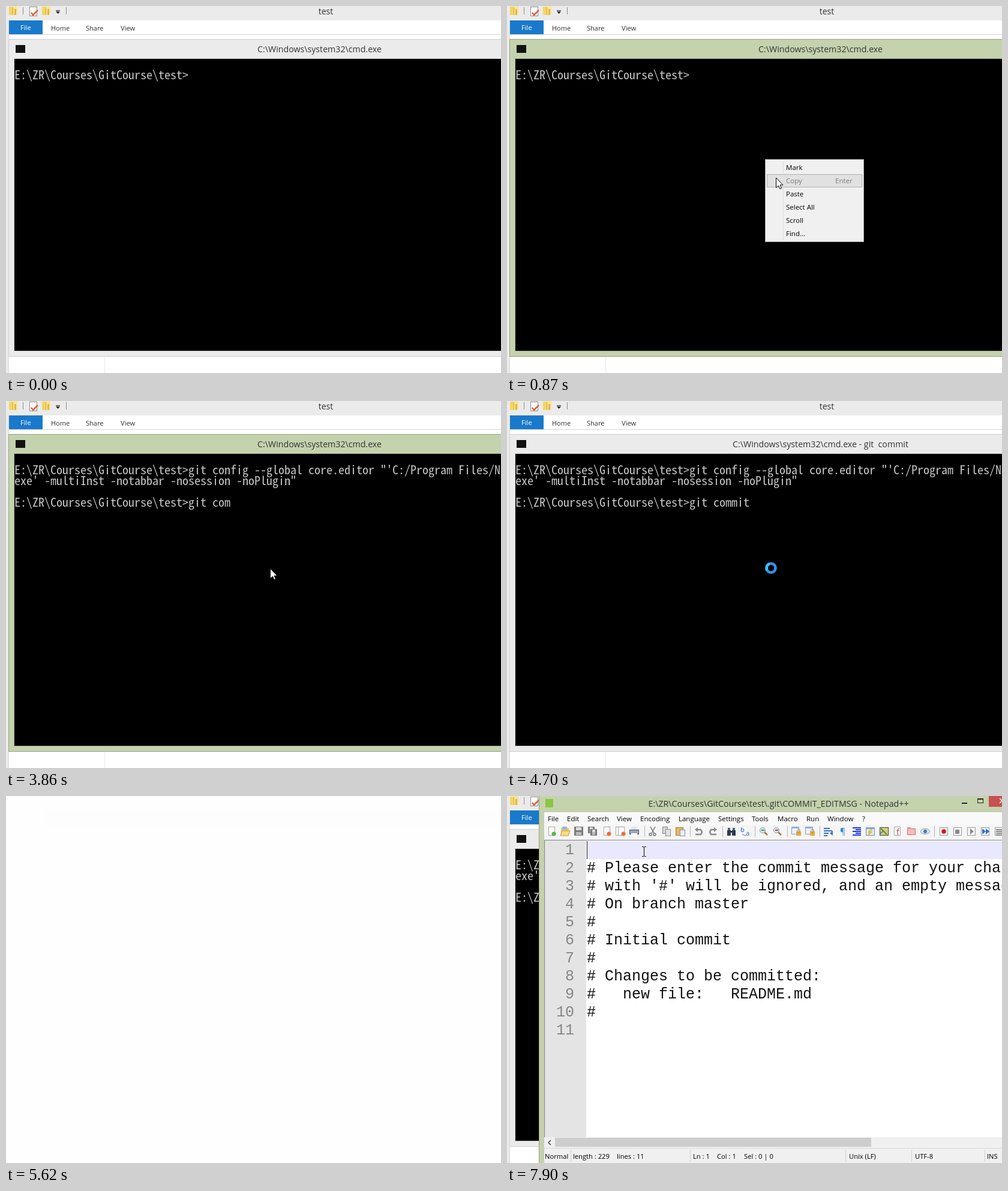
An HTML page with a canvas for the animation above (8000 ms loop, 825 by 611 pixels).

```html
<!DOCTYPE html>
<html lang="en">
<head>
<meta charset="utf-8">
<title>Git commit editor</title>
<style>
html, body { margin: 0; width: 100%; height: 100%; overflow: hidden; background: #ebebeb; }
canvas { display: block; }
</style>
</head>
<body>
<canvas id="stage" width="825" height="611"></canvas>
<script>
const ctx = document.getElementById('stage').getContext('2d');
const LOOP = 8000;
const UI = '"Open Sans", "Noto Sans", sans-serif';
const MONO = '"Noto Sans Mono CJK JP", "Noto Sans Mono", monospace';
const CODE = '"Liberation Mono", monospace';
const PROMPT = 'E:\\ZR\\Courses\\GitCourse\\test>';

function rect(x, y, w, h, color) {
  ctx.fillStyle = color;
  ctx.fillRect(x, y, w, h);
}

function frame(x, y, w, h, color, fill) {
  if (fill) rect(x, y, w, h, fill);
  ctx.strokeStyle = color;
  ctx.lineWidth = 1;
  ctx.strokeRect(x + 0.5, y + 0.5, w - 1, h - 1);
}

function text(str, x, y, size, color, family = UI, align = 'left') {
  ctx.font = `${size}px ${family}`;
  ctx.textAlign = align;
  ctx.fillStyle = color;
  ctx.fillText(str, x, y);
}

function poly(points, fill, stroke) {
  ctx.beginPath();
  points.forEach(([x, y]) => ctx.lineTo(x, y));
  ctx.closePath();
  if (fill) { ctx.fillStyle = fill; ctx.fill(); }
  if (stroke) { ctx.strokeStyle = stroke; ctx.lineWidth = 1; ctx.stroke(); }
}

function line(points, color, width = 1) {
  ctx.beginPath();
  points.forEach(([x, y]) => ctx.lineTo(x, y));
  ctx.strokeStyle = color;
  ctx.lineWidth = width;
  ctx.stroke();
}

function disc(x, y, r, fill, stroke, width = 1) {
  ctx.beginPath();
  ctx.arc(x, y, r, 0, Math.PI * 2);
  if (fill) { ctx.fillStyle = fill; ctx.fill(); }
  if (stroke) { ctx.strokeStyle = stroke; ctx.lineWidth = width; ctx.stroke(); }
}

// Position along [time, x, y] keys
function along(keys, t) {
  if (t <= keys[0][0]) return keys[0].slice(1);
  for (let i = 1; i < keys.length; i++) {
    const [t0, x0, y0] = keys[i - 1], [t1, x1, y1] = keys[i];
    if (t < t1) {
      const k = (t - t0) / (t1 - t0);
      return [Math.round(x0 + (x1 - x0) * k), Math.round(y0 + (y1 - y0) * k)];
    }
  }
  return keys[keys.length - 1].slice(1);
}

// Font size that gives a 10 px console cell
ctx.font = `100px ${MONO}`;
const cellSize = 1000 / ctx.measureText('M').width;

// ---- pointers ----
function arrow(x, y) {
  const shape = [[0, 0], [0, 16.5], [4, 13], [6.5, 18.5], [9, 17.5], [6.6, 12], [11.6, 12]];
  poly(shape.map(([a, b]) => [x + a + 0.5, y + b]), '#fff', '#000');
}

function beam(x, y) {
  rect(x, y - 7, 1, 15, '#000');
  for (const dy of [-8, 8]) {
    rect(x - 3, y + dy, 3, 1, '#000');
    rect(x + 1, y + dy, 3, 1, '#000');
  }
}

function busy(x, y) {
  disc(x, y, 7.5, null, '#2b94f0', 4.5);
  ctx.beginPath();
  ctx.arc(x, y, 7.5, 2.6, 4.4);
  ctx.strokeStyle = '#3fc0f8';
  ctx.stroke();
}

// ---- file window and console ----
function folder(x) {
  rect(x, 1, 8, 14, '#f3d566');
  rect(x + 6, 0, 8, 14, '#f9e596');
  rect(x + 6, 2, 1, 13, '#cfa93c');
  rect(x + 9, 5, 3, 10, '#e2b73f');
}

function explorer() {
  rect(0, 0, 825, 611, '#ebebeb');
  folder(5);
  folder(60);
  rect(28, 2, 1, 12, '#8c8c8c');
  rect(100, 2, 1, 12, '#8c8c8c');
  frame(39, 1, 13, 16, '#8d8d8d', '#fff');
  line([[42, 11], [45, 15], [53, 7]], '#e0603c', 2.5);
  rect(83, 7, 7, 1, '#222');
  poly([[83, 9], [90, 9], [86.5, 13]], '#222');
  text('test', 533, 14, 14, '#333', UI, 'center');

  rect(4, 24, 821, 587, '#fff');
  rect(4, 47, 821, 1, '#d6d6d6');
  rect(4, 24, 1, 587, '#d9d9d9');
  rect(5, 24, 56, 23, '#1979ca');
  text('File', 24, 40, 11.2, '#fff');
  text('Home', 75, 41, 11, '#333');
  text('Share', 133, 41, 11, '#333');
  text('View', 191, 41, 11.2, '#333');
  rect(164, 584, 1, 27, '#e9e9e9');
}

function consoleWindow(active, title) {
  frame(4, 55, 830, 529, active ? '#96a37f' : '#cfcfcf', active ? '#c4d2ad' : '#ebebeb');
  rect(16, 65, 16, 13, '#111');
  text(title, 522.5, 77, 14.2, '#333', UI, 'center');
  rect(13, 87, 812, 488, active ? '#a9b692' : '#d2d2d2');
  rect(14, 88, 811, 486, '#000');
}

function row(str, n) {
  text(str, 14, 122 + n * 18, cellSize, '#c6c6c6', MONO);
}

function caret(col, n) {
  rect(14 + col * 10, 119 + n * 18, 10, 4, '#c6c6c6');
}

function contextMenu(hover) {
  frame(430, 255, 165, 138, '#a5a5a5', '#f0f0f0');
  rect(460, 258, 1, 132, '#dcdcdc');
  frame(433, 280 + (hover - 1) * 22, 159, 22, hover === 1 ? '#b0b0b0' : '#88b8e8', hover === 1 ? '#e1e1e1' : '#d3e5f7');
  ['Mark', 'Copy', 'Paste', 'Select All', 'Scroll', 'Find...'].forEach((s, i) =>
    text(s, 465, 273 + i * 22, 11.5, i === 1 ? '#7a7a7a' : '#000'));
  text('Enter', 547, 295, 11.5, '#7a7a7a');
}

// ---- editor ----
const page = (x, mark) => {
  frame(x - 6, 51, 11, 15, '#a4a4a4', '#fff');
  if (mark) disc(x + 3, 63, 3.5, mark);
};
const disk = (x, y = 51, s = 15) => {
  rect(x - 8, y, s, s, '#7c7c7c');
  rect(x - 5, y + 1, s - 6, 5, '#ddd');
  rect(x - 5, y + s - 6, s - 6, 5, '#bbb');
};
const lens = (x, color) => {
  line([[x + 1, 60], [x + 6, 65]], '#a07840', 2.5);
  disc(x - 2, 57, 4.5, '#cfe6f5', '#8a9aa8');
  rect(x - 4, 56, 5, 2, color);
};
const bend = (x, s) => {
  line([[x - 6 * s, 64], [x + 3 * s, 64], [x + 5 * s, 60], [x + 3 * s, 56], [x - 3 * s, 56]], '#8a8a8a', 2.5);
  poly([[x - 7 * s, 56], [x - 2 * s, 52], [x - 2 * s, 60]], '#8a8a8a');
};
const panel = (x, fill, edge = '#8090a0') => frame(x - 7, 52, 15, 14, edge, fill);
const lockPane = x => {
  frame(x - 8, 51, 13, 13, '#7f9cc8', '#eef4fc');
  rect(x - 8, 51, 13, 3, '#8fb0dd');
  rect(x, 59, 8, 7, '#e8a83a');
  disc(x + 4, 58, 2.5, null, '#b58a3a');
};
const play = (x, color) => poly([[x, 54], [x + 6, 59], [x, 64]], color);

function toolbar() {
  page(75, '#55b848');
  rect(90, 53, 13, 10, '#f5c75b');
  rect(92, 51, 8, 5, '#8fb9e8');
  poly([[89, 66], [92, 58], [105, 58], [102, 66]], '#fbd981', '#c79a3c');
  disk(120);
  disk(143, 51, 11);
  disk(147, 55, 11);
  page(167, '#e8703a');
  page(187);
  page(191, '#e8703a');
  rect(207, 51, 10, 6, '#d9e8f8');
  frame(204, 56, 16, 8, '#4b5568', '#9aa6ba');
  rect(207, 62, 10, 5, '#fff');
  line([[239, 51], [245, 62]], '#777', 1.5);
  line([[247, 51], [241, 62]], '#777', 1.5);
  disc(239, 64, 2, null, '#777', 1.5);
  disc(246, 64, 2, null, '#777', 1.5);
  frame(259, 51, 9, 12, '#8a8a8a', '#d5d5d5');
  frame(264, 55, 9, 12, '#8a8a8a', '#e4e4e4');
  frame(281, 52, 13, 14, '#a67b35', '#e5b863');
  frame(288, 56, 9, 11, '#7d92b8', '#eef4ff');
  bend(320, 1);
  bend(343, -1);
  for (const x of [367, 375]) {
    rect(x, 57, 6, 9, '#2d3a50');
    rect(x + 1, 53, 4, 4, '#506080');
  }
  rect(372, 58, 4, 3, '#2d3a50');
  text('b', 389, 60, 11, '#2c5fb8');
  text('a', 398, 66, 11, '#2c5fb8');
  line([[392, 64], [398, 66]], '#4a80d0');
  lens(428, '#3aa03a');
  lens(451, '#d03a3a');
  lockPane(482);
  lockPane(505);
  for (const [y, w] of [[53, 10], [57, 14], [61, 8], [65, 6]]) rect(528, y, w, 2, '#3a6fc0');
  poly([[538, 62], [543, 58], [543, 66]], '#3a6fc0');
  text('\u00b6', 555, 64, 14, '#2f8ae0');
  for (let i = 0; i < 5; i++) rect(i % 2 ? 581 : 576, 52 + i * 3, i % 2 ? 9 : 14, 2, '#2038d8');
  panel(605, '#dbe9fa');
  rect(598, 52, 15, 3, '#7fa8dc');
  line([[608, 55], [603, 60], [607, 60], [602, 65]], '#f0b030', 2);
  panel(628, '#d9cf72', '#444');
  line([[623, 54], [633, 64]], '#5a8b4a', 2);
  line([[622, 63], [627, 58]], '#4a85c0', 2);
  page(651);
  text('f', 649, 65, 14, '#d02a2a');
  frame(667, 54, 14, 11, '#d07070', '#f4bcbc');
  rect(667, 52, 6, 3, '#e89090');
  ctx.beginPath();
  ctx.ellipse(697, 59, 7.5, 4.5, 0, 0, Math.PI * 2);
  ctx.fillStyle = '#dde6ee';
  ctx.fill();
  ctx.strokeStyle = '#8899a8';
  ctx.stroke();
  disc(697, 59, 3, '#3f7cb0');
  for (const x of [728, 751, 774, 797, 820]) frame(x - 7, 52, 14, 14, '#9a9a9a', '#fafafa');
  disc(728, 59, 3.8, '#d01818');
  rect(747, 56, 7, 7, '#8a8a8a');
  play(772, '#8a8a8a');
  play(792, '#2d6fd0');
  play(798, '#2d6fd0');
  for (let y = 55; y < 65; y += 3) rect(815, y, 10, 2, '#888');
  for (const x of [229, 305, 359, 413, 467, 521, 712]) rect(x, 50, 1, 18, '#b5b5b5');
}

const NOTES = [
  '',
  '# Please enter the commit message for your changes. Lines starting',
  "# with '#' will be ignored, and an empty message aborts the commit.",
  '# On branch master',
  '#',
  '# Initial commit',
  '#',
  '# Changes to be committed:',
  '#   new file:   README.md',
  '#',
  ''
];

function editor(caretOn) {
  rect(53, 0, 772, 611, '#c4d2ad');
  rect(53, 0, 1, 611, '#96a37f');
  rect(64, 5, 13, 14, '#8cc63f');
  text('E:\\ZR\\Courses\\GitCourse\\test\\.git\\COMMIT_EDITMSG - Notepad++', 452.5, 18, 14.2, '#333', UI, 'center');
  rect(758, 11, 9, 2, '#222');
  frame(784, 4, 10, 8, '#222');
  rect(784, 4, 10, 2, '#222');
  rect(803, 0, 22, 18, '#c75050');
  line([[821, 4], [829, 12]], '#fff', 1.5);
  line([[821, 12], [829, 4]], '#fff', 1.5);

  rect(62, 27, 763, 21, '#f9f9f9');
  const menu = { File: 68, Edit: 100, Search: 134, View: 183, Encoding: 222, Language: 286, Settings: 352, Tools: 408, Macro: 451, Run: 499, Window: 534, '?': 592 };
  for (const name in menu) text(name, menu[name], 42, 11.5, '#000');
  rect(62, 48, 763, 25, '#f5f5f5');
  toolbar();

  rect(62, 73, 763, 1, '#828282');
  rect(62, 74, 763, 494, '#fff');
  rect(62, 74, 1, 494, '#828282');
  rect(63, 74, 69, 494, '#e4e4e4');
  rect(133, 75, 692, 30, '#e8e8ff');
  NOTES.forEach((s, i) => {
    text(i + 1, 112, 97 + i * 30, 25, '#868686', CODE, 'right');
    text(s, 133, 127 + (i - 1) * 30, 25, '#111', CODE);
  });
  if (caretOn) rect(133, 75, 1, 30, '#202040');

  rect(62, 568, 763, 18, '#f0f0f0');
  rect(80, 569, 527, 15, '#cdcdcd');
  line([[73, 573], [69, 577], [73, 581]], '#444', 1.5);
  rect(62, 586, 763, 25, '#f0f0f0');
  rect(62, 586, 763, 1, '#d9d9d9');
  for (const x of [106, 305, 564, 674, 796]) rect(x, 589, 1, 20, '#d2d2d2');
  const status = { Normal: 63, 'length : 229': 110, 'lines : 11': 183, 'Ln : 1': 310, 'Col : 1': 350, 'Sel : 0 | 0': 395, 'Unix (LF)': 570, 'UTF-8': 680, INS: 800 };
  for (const s in status) text(s, status[s], 604, 11.2, '#000');
}

// ---- timeline ----
const POINTER = [
  [140, 640, 430], [540, 430, 255], [670, 430, 255], [870, 448, 286], [950, 448, 286],
  [1090, 449, 311], [1300, 449, 311], [1830, 441, 279], [2350, 441, 279], [2351, 440, 279]
];
const EDIT_POINTER = [[7250, 422, 13], [7700, 236, 114], [7900, 228, 92]];
const KEYS = [3220, 3320, 3410, 3650, 3720, 3790, 3860, 4090, 4200, 4310];
const COMMAND = 'git commit';
const CONFIG = 'git config --global core.editor "\'C:/Program Files/N';

function shell(t) {
  const active = t >= 600 && t < 4700;
  const path = 'C:\\Windows\\system32\\cmd.exe';
  explorer();
  consoleWindow(active, t >= 4550 ? path + ' - git  commit' : path);
  row(PROMPT + (t >= 1370 ? CONFIG : ''), 0);
  if (t >= 1370) row("exe' -multiInst -notabbar -nosession -noPlugin\"", 1);
  if (t >= 1750) row(PROMPT + COMMAND.slice(0, KEYS.filter(k => k <= t).length), 3);
  if (t >= 1160 && t < 1300) caret(29, 0);
  if (t >= 2580 && t < 3130) caret(29, 3);
  if (t >= 3650 && t < 3720) caret(33, 3);
}

function draw(t) {
  if (t >= 4760 && t < 6780) {
    rect(0, 0, 825, 611, '#fefefe');
    rect(62, 24, 763, 26, '#fdfdfd');
    return;
  }
  shell(t);
  if (t >= 6780) {
    editor(t < 7090 || t >= 7620);
    if (t >= 7250) {
      const [x, y] = along(EDIT_POINTER, t);
      (y < 74 ? arrow : beam)(x, y);
    }
  } else if (t >= 4700) {
    busy(440, 278);
  } else if (t >= 140) {
    const [x, y] = along(POINTER, t);
    if (t >= 670 && t < 1300) contextMenu(y < 302 ? 1 : 2);
    arrow(x, y);
  }
}

const start = performance.now();
function tick() {
  draw((performance.now() - start) % LOOP);
  requestAnimationFrame(tick);
}
tick();
</script>
</body>
</html>
```
